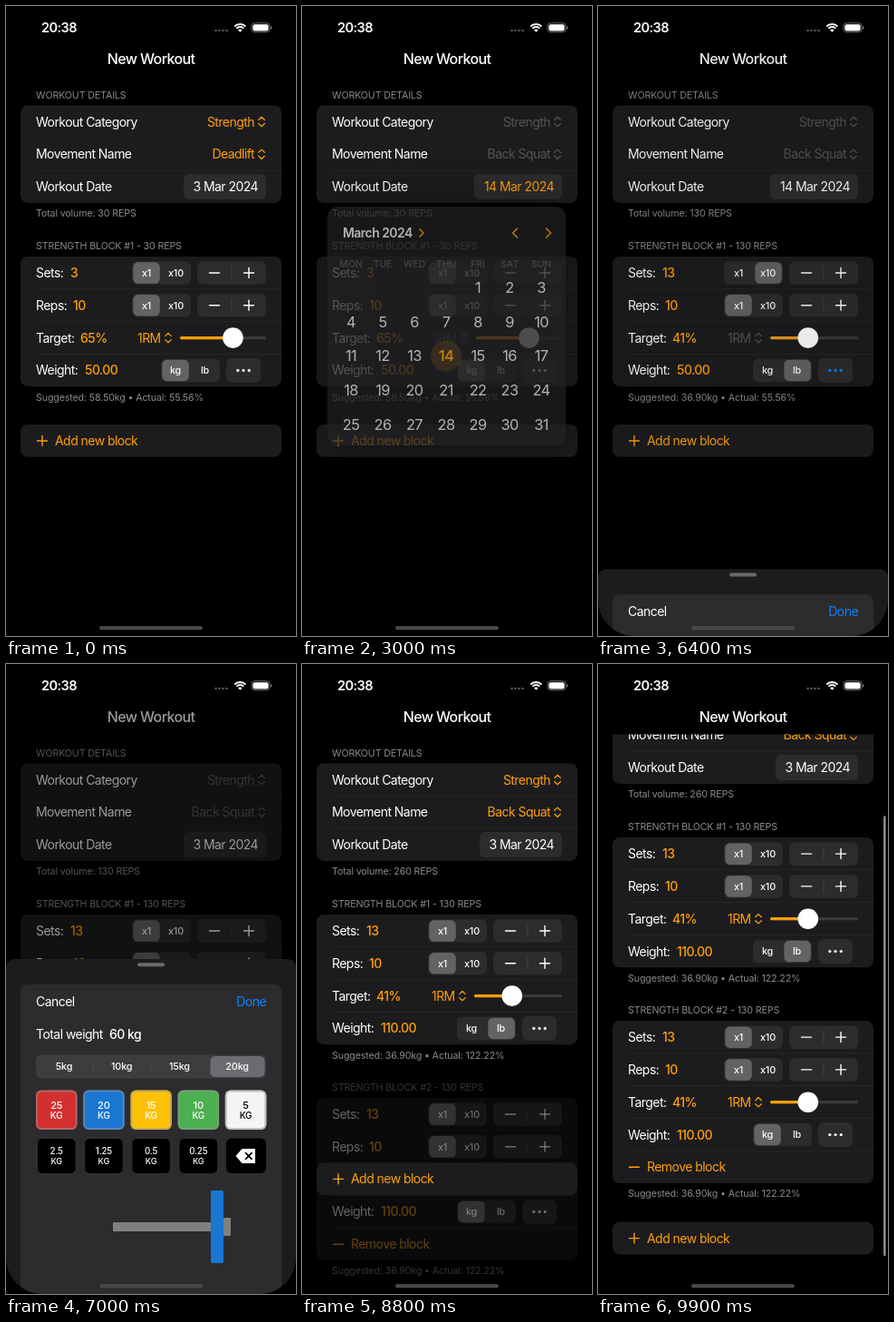
Write an HTML page with a canvas that moves like this. It is 320 by 694 pixels and loops after 10000 ms.

```html
<!DOCTYPE html>
<html lang="en">
<head>
<meta charset="utf-8">
<title>New Workout</title>
<style>
html, body { margin: 0; width: 100%; height: 100%; overflow: hidden; background: #000; }
canvas { display: block; width: 320px; height: 694px; }
</style>
</head>
<body>
<canvas id="stage"></canvas>
<script>
const canvas = document.getElementById('stage'), ctx = canvas.getContext('2d');
const dpr = window.devicePixelRatio || 1;
canvas.width = 320 * dpr;
canvas.height = 694 * dpr;

const ORANGE = '#ff9f0a', CARD = '#1c1c1e', FILL = '#2c2c2e', PICK = '#636366', BLUE = '#0a84ff', GREY = '#8a8a8e';

// Timing helpers
const ramp = (t, a, b) => Math.min(1, Math.max(0, (t - a) / (b - a)));
const glide = u => 1 - (1 - u) ** 2 * (1 + 1.25 * u);
const move = (t, a, b) => glide(ramp(t, a, b));
const mix = (a, b, k) => `rgb(${a.map((v, i) => Math.round(v + (b[i] - v) * k))})`;
const tinted = k => mix([255, 159, 10], [84, 84, 86], k);

// Drawing helpers
function text(s, x, y, { size = 14, color = '#fff', weight = 400, align = 'left' } = {}) {
  ctx.font = `${weight} ${size}px Inter, Roboto, sans-serif`;
  ctx.letterSpacing = size * (size > 13 ? -0.039 : -0.014) + 'px';
  ctx.textAlign = align;
  ctx.fillStyle = color;
  ctx.fillText(s, x, y + size * 0.36);
}
const caption = (s, y) => text(s, 33, y, { size: 10.7, color: GREY });
const centered = (s, x, y, size, color = '#fff', weight = 500) => text(s, x, y, { size, color, weight, align: 'center' });

function box(x, y, w, h, r, color) {
  ctx.fillStyle = color;
  ctx.beginPath();
  ctx.roundRect(x, y, w, h, r);
  ctx.fill();
}
function dot(x, y, r, color) {
  ctx.fillStyle = color;
  ctx.beginPath();
  ctx.arc(x, y, r, 0, 7);
  ctx.fill();
}
function line(points, color, width = 1.4) {
  ctx.strokeStyle = color;
  ctx.lineWidth = width;
  ctx.lineCap = ctx.lineJoin = 'round';
  ctx.beginPath();
  points.forEach(([x, y]) => ctx.lineTo(x, y));
  ctx.stroke();
}
const minus = (x, y, color) => line([[x - 5.5, y], [x + 5.5, y]], color);
function plus(x, y, color) {
  minus(x, y, color);
  line([[x, y - 5.5], [x, y + 5.5]], color);
}
function upDown(x, y, color) {
  for (const d of [-1, 1]) line([[x - 3.3, y + 2 * d], [x, y + 5.2 * d], [x + 3.3, y + 2 * d]], color, 1.2);
}
const chevron = (x, y, d, s = 1) => line([[x - 2.5 * d * s, y - 5 * s], [x + 2.5 * d * s, y], [x - 2.5 * d * s, y + 5 * s]], ORANGE, 1.7);

function card(y, rows) {
  box(16, y, 288, rows * 35.8, 8, CARD);
  for (let i = 1; i < rows; i++) box(33, y + i * 35.8 - 0.4, 271, 0.7, 0, '#2a2a2c');
}
function segment(x, y, labels, sel) {
  box(x, y - 12.7, 65, 25.5, 6, FILL);
  box(x + 1.3 + sel * 33, y - 11.7, 29.5, 23.5, 5.5, PICK);
  labels.forEach((s, i) => centered(s, x + 16 + i * 32.5, y, 10.8));
}
function counter(label, value, x, y, sel) {
  text(label, 33, y);
  text(value, x, y, { color: ORANGE, weight: 500 });
  segment(139, y, ['x1', 'x10'], sel);
  box(211, y - 12.7, 76, 25.5, 6, FILL);
  box(248.6, y - 7, 0.8, 14, 0, '#48484a');
  minus(230, y, '#fff');
  plus(268, y, '#fff');
}

function block(n, y, s, unit) {
  caption(`STRENGTH BLOCK #${n} - ${s.sets * 10} REPS`, y);
  const rows = n > 1 ? 5 : 4, row = i => y + 29.5 + i * 35.8;
  card(y + 11.5, rows);
  counter('Sets:', s.sets, 71, row(0), n > 1 ? 0 : s.step);
  counter('Reps:', 10, 74, row(1), 0);

  const left = 190 + (s.pct - 41) / 12, yt = row(2);
  const thumb = left + 11 + s.pct / 100 * (265 - left);
  text('Target:', 33, yt);
  text(s.pct + '%', 82, yt, { color: ORANGE, weight: 500 });
  text('1RM', left - 47, yt, { color: tinted(s.tint) });
  upDown(left - 13, yt, tinted(s.tint));
  box(left, yt - 1.6, 287 - left, 3.2, 1.6, '#3a3a3c');
  box(left, yt - 1.6, thumb - left, 3.2, 1.6, mix([255, 159, 10], [140, 130, 115], s.sliderTint));
  dot(thumb, yt, 11.3, '#fff');

  const yw = row(3);
  text('Weight:', 33, yw);
  text(s.weight.toFixed(2), 87, yw, { color: ORANGE, weight: 500 });
  segment(171, yw, ['kg', 'lb'], unit);
  box(243, yw - 13.5, 38, 27, 6, FILL);
  for (const x of [255.8, 262, 268.2]) dot(x, yw, 1.6, s.dots);

  if (n > 1) {
    minus(40, row(4), ORANGE);
    text('Remove block', 54, row(4), { color: ORANGE });
  }
  const actual = (s.weight / 90 * 100).toFixed(2);
  caption(`Suggested: ${(s.pct * 0.9).toFixed(2)}kg • Actual: ${actual}%`, y + 23 + rows * 35.8);
}

function page(s) {
  ctx.save();
  ctx.beginPath();
  ctx.rect(0, 77.5, 320, 617);
  ctx.clip();
  ctx.translate(0, -s.scroll);
  const tint = tinted(s.tint);
  caption('WORKOUT DETAILS', 98);
  card(109.5, 3);
  [['Workout Category', 'Strength'], ['Movement Name', s.movement]].forEach(([label, value], i) => {
    const y = 127.5 + i * 35.8;
    text(label, 33, y);
    text(value, 274, y, { color: tint, align: 'right' });
    upDown(282, y, tint);
  });
  text('Workout Date', 33, 199.3);
  const left = s.date.length > 10 ? 189.5 : 196;
  box(left, 185, 287 - left, 28, 6, FILL);
  text(s.date, 278, 199.3, { align: 'right', color: s.dateOpen ? ORANGE : '#fff' });
  caption(`Total volume: ${s.sets * (s.added ? 20 : 10)} REPS`, 228);

  block(1, 264.5, s, s.unit);
  if (s.added) {
    ctx.globalAlpha = s.added;
    block(2, 466.5, s, 0);
    ctx.globalAlpha = 1;
  }
  const y = 461 + 238.5 * s.added;
  card(y, 1);
  plus(40, y + 18, ORANGE);
  text('Add new block', 54, y + 18, { color: ORANGE });
  ctx.restore();
  if (s.scroll) box(315, 131 + (s.scroll - 39.7) * 0.8, 2.5, 485, 1.3, '#8c8c8e');
}

// Scales and unrolls a popover out of its anchor point.
function popover(x, y, w, h, ax, ay, open, fade, draw) {
  const k = 0.1 + 0.9 * open;
  ctx.save();
  ctx.translate(ax, ay);
  ctx.scale(k, k);
  ctx.translate(-ax, -ay);
  ctx.globalAlpha = open * fade;
  ctx.shadowColor = 'rgba(0,0,0,.6)';
  ctx.shadowBlur = 50 * dpr;
  box(x, y, w, h * k, 11, '#252527');
  ctx.shadowColor = 'transparent';
  ctx.beginPath();
  ctx.rect(x, y, w, h * k);
  ctx.clip();
  ctx.globalAlpha = Math.min(1, open * 1.2) * fade;
  draw();
  ctx.restore();
}

const MOVES = ['Back Squat', 'Bench Press', 'Deadlift', 'Front Squat', 'Overhead Press', 'Power Clean', 'Snatch'];
function menu(chosen) {
  MOVES.forEach((name, i) => {
    const y = 199 + i * 36;
    text(name, 108, y);
    if (name === chosen) line([[92, y], [95, y + 3.5], [100, y - 4.5]], '#fff', 1.5);
    if (i) box(82, y - 18, 205, 0.7, 0, '#3a3a3c');
  });
}

function calendar(day) {
  text('March 2024', 45, 250, { weight: 600 });
  chevron(132, 250, 1, 0.8);
  chevron(235, 250, -1);
  chevron(272, 250, 1);
  'MON TUE WED THU FRI SAT SUN'.split(' ').forEach((d, i) => centered(d, 54 + i * 35, 284, 10.5, '#505054', 600));
  for (let d = 1; d <= 31; d++) {
    const cell = d + 3, x = 54 + cell % 7 * 35, y = 310 + Math.floor(cell / 7) * 37.7, on = d === day;
    if (on) dot(x, y, 17, 'rgba(255,159,10,.17)');
    centered(d, x, y, 16.4, on ? ORANGE : '#fff', on ? 600 : 400);
  }
}

const KEYS = [['25', '#d32f2f'], ['20', '#1976d2'], ['15', '#ffc107'], ['10', '#4caf50'], ['5', '#f5f5f5']];
const PLATES = [[226, 14, 80, '#1976d2', 7000, 40], [212, 13.5, 70, '#ffc107', 7300, 30], [203, 8.5, 56, '#4caf50', 7600, 20]];
const loaded = t => PLATES.filter(p => t >= p[4]);
const total = t => loaded(t).reduce((sum, p) => sum + p[5], 20);

function sheet(t, rise) {
  ctx.fillStyle = `rgba(0,0,0,${0.4 * rise})`;
  ctx.fillRect(0, 40, 320, 654);
  ctx.save();
  ctx.beginPath();
  ctx.roundRect(0, 0, 320, 694, [0, 0, 40, 40]);
  ctx.clip();
  ctx.translate(0, 295 - 369 * rise);
  box(0, 399, 320, 700, 9, CARD);
  box(145, 403.3, 30, 4, 2, '#6a6a6c');
  box(16, 427, 288, 600, 8, FILL);
  text('Cancel', 33, 446);
  text('Done', 287, 446, { color: BLUE, align: 'right' });
  text('Total weight', 33, 481.5);
  text(total(t) + ' kg', 114, 481.5, { weight: 500 });

  box(33, 504.5, 254, 26, 6, '#3d3d40');
  box(225.5, 506, 60, 23, 5.5, '#6c6c70');
  for (const x of [96, 159.5]) box(x, 512, 0.8, 11, 0, '#505053');
  ['5kg', '10kg', '15kg', '20kg'].forEach((s, i) => centered(s, 64 + i * 63.7, 517.5, 10.8));

  KEYS.forEach(([kg, color], i) => {
    const x = 33 + i * 52.2, ink = i === 4 ? '#000' : '#fff';
    box(x, 543.5, 45.5, 43.5, 6, color);
    ctx.strokeStyle = 'rgba(150,150,150,.55)';
    ctx.lineWidth = 2;
    ctx.beginPath();
    ctx.roundRect(x + 1, 544.5, 43.5, 41.5, 5);
    ctx.stroke();
    centered(kg, x + 22.7, 560, 11, ink);
    centered('KG', x + 22.7, 571.5, 10, ink);
  });
  ['2.5', '1.25', '0.5', '0.25'].forEach((kg, i) => {
    const x = 35 + i * 52.2;
    box(x, 597, 41.5, 38, 5, '#000');
    centered(kg, x + 20.7, 610.5, 9.7);
    centered('KG', x + 20.7, 621.5, 9.2);
  });
  box(243, 596.5, 44, 38.5, 6, '#000');
  ctx.fillStyle = '#fff';
  ctx.beginPath();
  [[253.5, 616], [260.5, 608], [275, 608], [275, 624], [260.5, 624]].forEach(p => ctx.lineTo(...p));
  ctx.fill();
  for (const d of [-1, 1]) line([[264.5, 616 - 3.3 * d], [271, 616 + 3.3 * d]], '#000', 1.8);

  box(118, 689, 122, 10, 1, '#808080');
  box(240, 684, 8, 20, 1, '#808080');
  for (const [x, w, h, color] of loaded(t)) box(x, 694 - h / 2, w, h, 2, color);
  ctx.restore();
}

function statusBar() {
  centered('20:38', 58.5, 24, 14.6, '#fff', 600);
  for (let i = 0; i < 4; i++) dot(231.5 + i * 4, 27, 1.3, '#55555a');
  ctx.strokeStyle = '#fff';
  ctx.lineWidth = 2;
  ctx.lineCap = 'butt';
  for (const r of [5.4, 8.6]) {
    ctx.beginPath();
    ctx.arc(258.3, 28.5, r, -Math.PI * 0.75, -Math.PI * 0.25);
    ctx.stroke();
  }
  ctx.fillStyle = '#fff';
  ctx.beginPath();
  ctx.moveTo(258.3, 28.8);
  ctx.arc(258.3, 28.8, 3.2, -Math.PI * 0.75, -Math.PI * 0.25);
  ctx.fill();
  ctx.strokeStyle = '#77777a';
  ctx.lineWidth = 0.9;
  ctx.beginPath();
  ctx.roundRect(271, 18.8, 20, 10, 3.2);
  ctx.stroke();
  box(272.4, 20.2, 17.2, 7.2, 2, '#fff');
  box(292, 22.2, 1.4, 3.4, 0.7, '#77777a');
}

function draw(t) {
  ctx.setTransform(dpr, 0, 0, dpr, 0, 0);
  ctx.fillStyle = '#000';
  ctx.fillRect(0, 0, 320, 694);

  const rise = move(t, 6300, 6800) - move(t, 8100, 8600);
  const inside = (a, b) => t >= a && t < b;
  const menuFade = 1 - ramp(t, 800, 1200), dateFade = 1 - ramp(t, 2900, 3200);
  const day = inside(2200, 7000) ? 14 : 3;
  const state = {
    movement: t < 1000 ? 'Deadlift' : 'Back Squat',
    date: day + ' Mar 2024',
    dateOpen: inside(1500, 3100),
    sets: t < 4200 ? 3 : 13,
    step: t < 7000 ? ramp(t, 3700, 4000) : 0,
    pct: Math.round(65 - 24 * ramp(t, 4700, 5200)),
    unit: ramp(t, 5800, 6100),
    weight: t < 7000 ? 50 : total(t),
    tint: inside(400, 1100) || inside(1700, 3100) || inside(6400, 8200) ? 1 : 0,
    sliderTint: ramp(t, 6300, 6800) - ramp(t, 8100, 8600),
    dots: inside(6400, 8300) ? BLUE : '#fff',
    added: move(t, 8700, 9000),
    scroll: t < 9300 ? 0 : 86 * (1 - Math.exp(-6.2 * (t - 9200) / 1000))
  };

  page(state);
  centered('New Workout', 160, 58, 16, '#fff', 500);
  if (inside(200, 1200)) popover(82, 181, 205, 252, 256, 170, move(t, 150, 600), menuFade, () => menu(state.movement));
  if (inside(1500, 3200)) popover(28, 221, 263, 263, 238, 217, move(t, 1400, 1740), dateFade, () => calendar(day));
  if (rise > 0) sheet(t, rise);
  statusBar();
  box(103, 683, 114, 4.2, 2.1, '#48484a');
}

function tick() {
  draw(Math.floor(performance.now() % 10000 / 100) * 100);
  requestAnimationFrame(tick);
}
tick();
</script>
</body>
</html>
```
